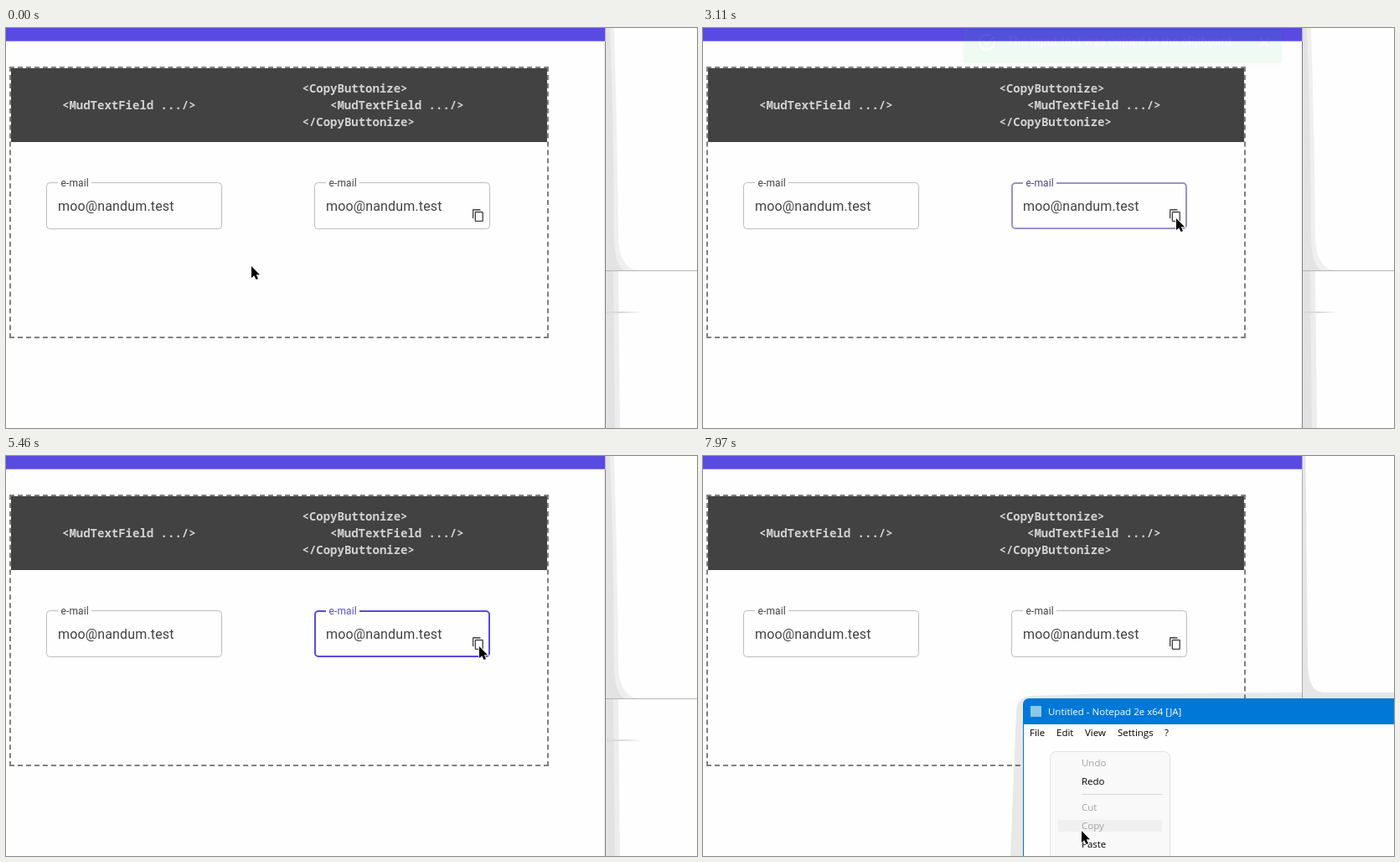
Recreate the animation shown at these times as an HTML page. Size 825 px wide and 477 px high, loop 8 s.

```html
<!DOCTYPE html>
<html lang="en">
<head>
<meta charset="utf-8">
<title>Copy button demo</title>
<style>
  html, body { margin: 0; width: 100%; height: 100%; overflow: hidden; background: #fefefe; }
  svg { display: block; width: 100vw; height: 100vh; }
  text { white-space: pre; }
  .code { font: 700 14px "Noto Sans Mono", monospace; fill: #d2d2d2; }
  .value { font: 16px Roboto, sans-serif; letter-spacing: .15px; fill: #424242; }
  .label { font: 12px Roboto, sans-serif; letter-spacing: .11px; fill: #424242; }
  .toast { font: 500 14px Roboto, sans-serif; letter-spacing: .15px; fill: #fff; }
  .ui { font: 11.5px "Open Sans", sans-serif; fill: #000; }
  .ui .off { fill: #a3a3a3; }
  .line { fill: none; stroke: #bdbdbd; }
  .dash { stroke: #808080; stroke-width: 2; }
</style>
</head>
<body>
<svg viewBox="0 0 825 477" preserveAspectRatio="none">
  <defs>
    <filter id="soft" x="-10%" y="-50%" width="120%" height="200%">
      <feGaussianBlur stdDeviation="3"/>
    </filter>
  </defs>
  <rect width="825" height="477" fill="#fefefe"/>

  <g id="behind">
    <path d="M716 0H726Q730 130 731 250Q732 284 752 289H716Z" fill="#efefef"/>
    <path d="M716 0H721Q726 130 726 250Q727 284 738 289H716Z" fill="#e3e3e3"/>
    <path d="M716 290H731L733 477H716Z" fill="#ededed"/>
    <path d="M716 290H725L727 477H716Z" fill="#e2e2e2"/>
    <path d="M716 289.5H825" stroke="#b4b4b4"/>
    <path d="M716 338H735L760 339L735 340H716Z" fill="#dadada"/>
  </g>

  <rect width="715.5" height="15.7" fill="#594ae2"/>
  <path id="edge" d="M715.5 16V477" stroke="#7c7c7c"/>
  <rect x="6" y="48" width="640" height="88" fill="#424242"/>
  <g class="dash">
    <path d="M4 47H648M4 369H648" stroke-dasharray="6 3.97"/>
    <path d="M5 46V370M647 46V370" stroke-dasharray="6 3.94"/>
  </g>
  <g class="code">
    <text x="67" y="97">&lt;MudTextField .../&gt;</text>
    <text x="353.5" y="77">&lt;CopyButtonize&gt;</text>
    <text x="387" y="97">&lt;MudTextField .../&gt;</text>
    <text x="353.5" y="117">&lt;/CopyButtonize&gt;</text>
  </g>

  <g id="fields"></g>
  <path transform="translate(555.6 215.4) scale(.68)" fill="#424242" fill-rule="evenodd"
    d="M16 1H4Q2 1 2 3V17H4V3H16ZM19 5H8Q6 5 6 7V21Q6 23 8 23H19Q21 23 21 21V7Q21 5 19 5ZM19 21H8V7H19Z"/>

  <g id="tip">
    <rect x="575.5" y="239.5" width="113" height="24" fill="#fff" stroke="#2b2b2b"/>
    <text class="ui" x="583" y="256">Copy to clipboard.</text>
  </g>

  <g id="toast">
    <rect x="311" y="-6" width="380" height="49" rx="4" opacity=".4" filter="url(#soft)"/>
    <rect x="311" y="-6" width="380" height="48" rx="4" fill="#00c853"/>
    <g fill="none" stroke="#fff" stroke-width="1.8">
      <path d="M347.6 15A8.9 8.9 0 1 1 343.4 9.2"/>
      <path d="M334.6 15.6L338.6 19.6L348.4 9.8"/>
      <path d="M665 12L675 22M675 12L665 22"/>
    </g>
    <text class="toast" x="363" y="21">The input text was copied to the clipboard.</text>
  </g>

  <g id="editor">
    <path d="M716 0H825V289H716Z" fill="#fefefe"/>
    <path d="M716 0H719.5L722 245Q722 281 740 282H825V290H716Z" fill="#e6e6e6"/>
    <path d="M367 477L374 305Q375 287 392 286L470 283.5L716 282V300H390V477Z" fill="#000" fill-opacity=".085"/>
    <path d="M382 477V297Q382 289 390 289H825V477Z" fill="#0078d7"/>
    <path d="M383 320H825V477H383Z" fill="#fefefe"/>
    <rect x="391" y="298" width="13" height="13" fill="#8cc8e8"/>
    <g class="ui">
      <text x="412" y="309" style="fill:#fff">Untitled - Notepad 2e x64 [JA]</text>
      <text x="390" y="334">File</text>
      <text x="422" y="334">Edit</text>
      <text x="456" y="334">View</text>
      <text x="495" y="334">Settings</text>
      <text x="551" y="334">?</text>
    </g>
    <rect id="caret" x="384" y="340" width="1" height="15"/>
    <g id="menu" class="ui">
      <rect x="414.5" y="352.5" width="143" height="140" rx="7" fill="#f9f9f9" stroke="#e2e2e2"/>
      <rect id="row" x="424" width="124" height="14" fill="#f0f0f0"/>
      <path d="M453 403.5H549" stroke="#d6d6d6"/>
      <text class="off" x="452" y="370">Undo</text>
      <text x="452" y="392">Redo</text>
      <text class="off" x="452" y="423">Cut</text>
      <text class="off" x="452" y="445">Copy</text>
      <text x="452" y="467">Paste</text>
    </g>
  </g>

  <path id="cursor" d="M0 0V14L3.2 11.2L5.6 16L8 14.9L5.8 10.2H10Z" stroke="#fff" stroke-width="1.6" paint-order="stroke"/>
</svg>
<script>
const LOOP = 8000, CLICK = 3080, RAISE = 6335, MENU = 7280;
const GREY = [189, 189, 189], DARK = [117, 117, 117], TEXT = [66, 66, 66], PURPLE = [89, 74, 226];
const $ = id => document.getElementById(id);
const set = (el, attrs) => { for (const k in attrs) el.setAttribute(k, attrs[k]); };
const show = (id, on) => set($(id), { visibility: on ? "visible" : "hidden" });
const ramp = (t, a, b) => Math.min(1, Math.max(0, (t - a) / (b - a)));
const mix = (a, b, p) => `rgb(${a.map((v, i) => Math.round(v + (b[i] - v) * p))})`;

const ease = {
  both: p => p * p * (3 - 2 * p),
  into: p => p ** 1.5,
  out: p => 1 - (1 - p) ** 1.5
};
// time, x, y, easing used to get there
const track = [
  [760, 293, 284, "both"], [1540, 549, 231, "both"], [1840, 565, 227, "out"],
  [5790, 565, 227, "both"], [6280, 770, 312, "both"], [6345, 770, 312, "both"],
  [6600, 632, 314, "into"], [7190, 414, 350, "out"], [7600, 414, 350, "both"],
  [7965, 452, 447, "both"]
];

function pointer(t) {
  let i = track.findIndex(k => k[0] > t);
  if (i === 0) return track[0].slice(1, 3);
  if (i < 0) return track[track.length - 1].slice(1, 3);
  const a = track[i - 1], b = track[i];
  const p = ease[b[3]](ramp(t, a[0], b[0]));
  return [a[1] + (b[1] - a[1]) * p, a[2] + (b[2] - a[2]) * p];
}

function field(x, id) {
  return `<g id="${id}">
    <rect class="line" x="${x + .5}" y="184.5" width="209" height="55" rx="4"/>
    <rect x="${x + 14}" y="183" width="40" height="4" fill="#fefefe"/>
    <text class="label" x="${x + 17.5}" y="189">e-mail</text>
    <text class="value" x="${x + 14}" y="218">moo@nandum.test</text></g>`;
}
$("fields").innerHTML = field(48, "plain") + field(368, "copy");
const border = $("copy").querySelector(".line"), label = $("copy").querySelector(".label");

function drawField(t) {
  const focused = t >= CLICK && t < RAISE;
  const tint = ramp(t, CLICK - 40, CLICK + 150) * (1 - ramp(t, RAISE + 50, RAISE + 250));
  const hover = ramp(t, 1290, 1470) - ramp(t, 1630, 1830);
  const w = focused ? 2 : 1;
  set(border, {
    x: 368 + w / 2, y: 184 + w / 2, width: 210 - w, height: 56 - w, "stroke-width": w
  });
  border.style.stroke = tint > 0 ? mix(GREY, PURPLE, tint) : mix(GREY, DARK, hover);
  label.style.fill = mix(TEXT, PURPLE, tint);
}

function draw(t) {
  const [x, y] = pointer(t), raised = t >= RAISE;
  set($("cursor"), { transform: `translate(${x.toFixed(1)} ${y.toFixed(1)})` });
  drawField(t);
  show("tip", t >= 2210 && t < CLICK);
  set($("toast"), { opacity: .96 * ramp(t, 3100, 3290) * (1 - ramp(t, 5255, 5455)) });

  show("editor", raised);
  show("behind", !raised);
  set($("edge"), { stroke: raised ? "#b0b0b0" : "#7c7c7c" });
  show("caret", raised && t >= 6360 && Math.floor((t - 6360) / 530) % 2 === 0);

  show("menu", t >= MENU);
  set($("menu"), { opacity: ramp(t, MENU - 30, MENU + 130) });
  const row = [366, 388, 419, 441].find(c => Math.abs(y + 1 - c) < 11);
  show("row", t >= 7610 && row);
  if (row) set($("row"), { y: row - 7 });
}

function tick() {
  draw(performance.now() % LOOP);
  requestAnimationFrame(tick);
}
tick();
</script>
</body>
</html>
```
